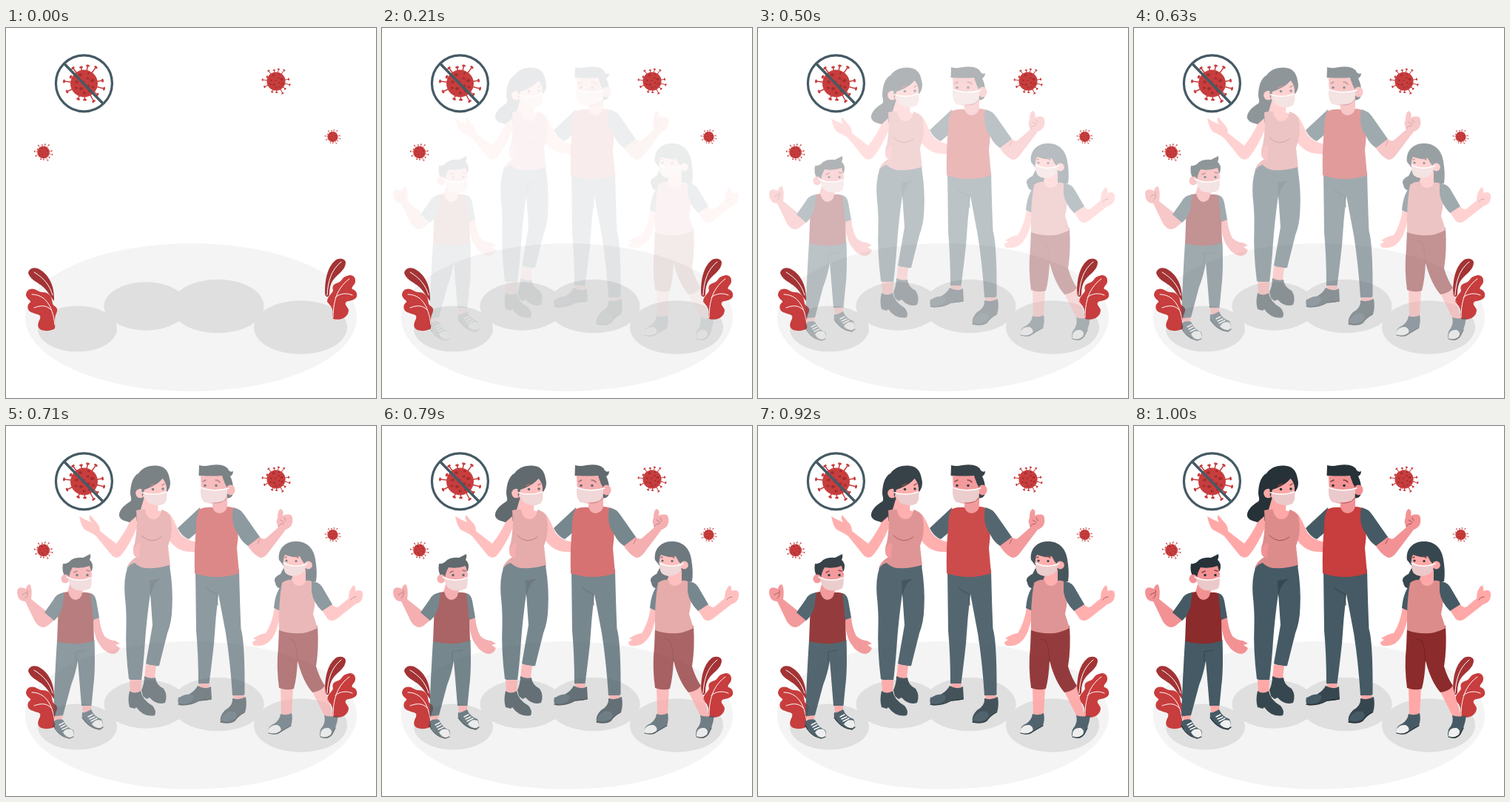
These frames come from a looping animation (500 by 500 pixels, 1040 ms). An HTML page:

```html
<!DOCTYPE html>
<html lang="en">
<head>
<meta charset="utf-8">
<title>Family in masks</title>
<style>
html, body { margin: 0; width: 100%; height: 100%; overflow: hidden; background: #fff; }
svg { display: block; width: 100vw; height: 100vh; }
.navy { fill: #455a64; }
.ink { fill: #263238; }
.slate { fill: #37474f; }
.skin { fill: #ffa8a7; }
.arm { fill: #f29294; }
.red { fill: #c83d3d; }
.wine { fill: #8b2b2c; }
.pink { fill: #dd8c8c; }
.mask { fill: #ebc9ca; }
.pale { fill: #f0f0f0; }
.line { fill: none; stroke-linecap: round; stroke-linejoin: round; }
.strap { stroke: #fff; stroke-width: 1.5; }
.fold { stroke: #37474f; stroke-width: 1.2; }
.crease { stroke: #a85055; stroke-width: 1; }
.brow { stroke: #8b3a3c; stroke-width: 1.4; }
.vein { stroke: #fff; stroke-width: 1; }
.sole { stroke: #263238; stroke-width: 1.3; }
</style>
</head>
<body>
<svg viewBox="0 0 500 500">
  <defs><g id="virus"></g></defs>

  <ellipse cx="250" cy="391" rx="224" ry="100" fill="#f4f4f4"/>
  <g fill="#dfdfdf">
    <ellipse cx="96.5" cy="406.5" rx="53.5" ry="31"/>
    <ellipse cx="189" cy="376" rx="56.5" ry="32.7"/>
    <ellipse cx="286" cy="376" rx="62.5" ry="36.3"/>
    <ellipse cx="398" cy="404.5" rx="63" ry="36.3"/>
  </g>

  <use href="#virus" transform="translate(105.5 75)"/>
  <use href="#virus" transform="translate(365 72) scale(.68)"/>
  <use href="#virus" transform="translate(50.6 168) scale(.45)"/>
  <use href="#virus" transform="translate(441.5 147) scale(.38)"/>
  <g fill="none" stroke="#455a64" stroke-width="3.2">
    <circle cx="105.4" cy="74.8" r="38"/>
    <path d="M78.500 48L131.500 102.500" stroke-width="3.600"/>
  </g>

  <!-- plants -->
  <path fill="#a33335" d="M30 331C31 325 37 323 43 325C56 331 66 346 65 369C60 363 56 354 48 348C41 343 32 339 30 331Z"/>
  <path class="red" d="M27 361C27 354 33 351 39 353C43 355 46 357 49 357C56 357 59 360 61 364C63 369 62 374 66 376C71 379 69 384 67 388C65 394 67 400 66 406C61 410 50 410 46 407C41 403 44 397 46 393C48 386 42 388 37 385C31 384 28 379 30 374C32 370 35 371 32 368C30 366 28 365 27 361Z"/>
  <path class="line vein" d="M38 330C50 337 59 347 63 361M35 360C52 360 63 374 66 401M38 378C48 374 56 375 61 381"/>
  <path fill="#a33335" d="M459 317C459 312 450 310 445 314C434 323 431 340 431 358C431 364 436 365 437 360C437 348 440 342 446 336C452 330 459 325 459 317Z"/>
  <path class="red" d="M441 388C443 379 438 375 434 370C434 363 440 360 442 355C440 347 444 346 449 344C454 343 454 336 461 335C468 332 473 337 472 343C471 348 466 350 468 353C473 354 475 359 474 363C471 369 464 368 460 370C456 373 462 377 463 381C463 391 452 396 442 393Z"/>
  <path class="line vein" d="M453 316C439 327 435 343 434 361M464 339C450 349 442 365 442 391M445 364C452 358 461 358 468 361"/>

  <g id="family" opacity="0">
    <!-- mother -->
    <path class="navy" d="M262 110L232 138Q237 149 247 153L259 143Z"/>
    <path class="ink" d="M217 90C222 84 223 78 221 71C219 59 213 54 203 53.500C191 53 183 58 179 64C171 68 168 80 168 92C169 97 170 100 168 102C158 108 152 115 153 122C156 129 164 128 168 131L178 128L186 110L190 100Z"/>
    <path class="skin" d="M187 96L206 101L205 114L211 116L206 130H188L181 116Z"/>
    <path class="skin" d="M215 115C226 119 230 137 235 145C242 153 249 155 258 157V170C244 171 236 168 230 164Q221 157 217 148Z"/>
    <path class="skin" d="M176 122L177 137Q167 161 156 174Q150 181 143 175L122 149Q117 145 108 141Q102 138 99 122L106 126L115 130Q111 123 114 120.500L121 129Q127 134 127 142L149 159Q160 145 167 130Z"/>
    <path class="pink" d="M176 114Q183 112 188 113Q190 126 200 126Q209 125 210 113Q218 115 222 122Q227 142 219 162L222 190Q202 201 163 193Q165 184 176 177Q169 169 174 158Q178 138 176 114Z"/>
    <path class="arm" d="M180 158Q172 163 172 170Q172 178 181 178Q179 168 182 161Z"/>
    <path class="line crease" d="M183 148Q196 161 210 150"/>
    <path class="navy" d="M164 192Q168 186 174 185Q185 198 221 188Q226 220 224.500 245Q224 265 218 280L207 324Q197 325 189 321L198 269L195 226Q190 262 188 290Q186 320 183 344Q174 346 166 342Q161 302 162.500 270Q163 250 160.500 228Q159 207 164 192Z"/>
    <path class="slate" d="M194 209L211 206Q198 211 195 232Z"/>
    <path class="skin" d="M167 343H183L182 361H168ZM189 322L203 324L201 341H187Z"/>
    <path class="slate" d="M187 338Q194 342 202 340Q203 350 213 355Q219 364 215 374Q204 378 194 367L190 369L185 365L183 357Q187 348 187 338ZM167 358Q174 363 182 358Q184 370 198 378Q204 385 201 391Q186 394 176 380L174 382L167 380Q164 370 167 358Z"/>
    <circle class="skin" cx="181.500" cy="91" r="6.300"/>
    <path class="skin" d="M185 86Q202 81 209 69Q216 74 217 83L217 99Q212 108 202 107Q188 105 185 94Z"/>
    <path class="ink" d="M182 64Q207 56 214 67Q208 79 187 86L184 97Z"/>
    <path class="mask" d="M186 92Q201 94 216 89Q218 101 214 105Q203 110 193 104Q188 100 186 92Z"/>
    <path class="line strap" d="M184 90Q201 95 217 89"/>
    <path class="line brow" d="M195 81Q198 78 201 79M211 80L214 78"/>
    <circle class="ink" cx="198.500" cy="85.500" r="1.800"/><circle class="ink" cx="212" cy="85" r="1.700"/>

    <!-- father -->
    <path class="arm" d="M279 100L299 94V110L303 114L288 124L274 113L279 110Z"/>
    <path class="arm" d="M326 161L342 149Q348 155 352 151L368 137Q364 129 367 124Q367 114 371 112Q376 114 374 121Q386 117 387 124Q389 136 378 140L353 173Q346 181 340 176Q333 172 326 161Z"/>
    <path class="line crease" d="M368 136Q370 132 375 132M371 127L376 130M376 124L378 128"/>
    <path class="line crease" d="M340 159L343 153"/>
    <path class="navy" d="M256 194H315Q316 240 317.500 274Q323 292 322.500 363Q315 367 306 364Q303 318 297 280L287 227Q283 260 281 294Q277 330 274.500 348Q267 351 260 348Q260 310 257 276Z"/>
    <path class="line fold" d="M271 219Q279 225 285 227L286 242"/>
    <path class="red" d="M262 112Q270 109 279 110Q282 118 289 118Q297 117 299 109Q306 109 311 113Q316 140 312 165L315 199Q285 209 255 199Q254 165 257 138Q257 118 262 112Z"/>
    <path class="navy" d="M307 110Q317 112 322 120L343 150L327 162Q319 157 314 147Q306 136 306 124Q306 116 307 110Z"/>
    <path class="skin" d="M261 348H275L274 355H261ZM307 364H322V370H308Z"/>
    <path class="slate" d="M259 351Q269 357 277 352L278 369Q268 372 261 371Q248 378 235 377Q231 374 233 367Q252 364 259 351ZM306 368Q315 371 324 366Q326 378 323 387Q314 392 309 399Q299 403 290 400Q288 392 296 384Q307 378 306 368Z"/>
    <path class="navy" d="M233 368Q243 360 253 364Q255 369 248 374Q240 377 233 375ZM291 395Q297 383 309 386Q314 390 309 396Q300 401 291 398Z"/>
    <path class="line sole" d="M233 376Q247 379 261 371L277 369M290 400Q303 403 309 398Q315 390 322 387"/>
    <path class="ink" d="M260.500 67L261 53Q268 55 276 53Q297 50 301 60Q304 63 307 61Q307 66 303 68Q309 80 306 94Q302 99 297 97L294 73Z"/>
    <path class="arm" d="M263 67Q279 68 292 67Q295 77 298 82L299 97Q294 105 280 105Q265 104 264 93Z"/>
    <ellipse class="arm" cx="303.500" cy="86.500" rx="6" ry="7"/>
    <path class="line crease" d="M280 104Q292 105 298 98"/>
    <path class="mask" d="M263 84Q282 89 299 84Q300 96 294 101Q282 105 268 103Q262 98 263 84Z"/>
    <path class="line strap" d="M263 83Q281 90 301 84"/>
    <path class="line brow" d="M266 75L270 73M283 73Q287 73 289 76"/>
    <circle class="ink" cx="269" cy="80.500" r="1.800"/><circle class="ink" cx="284" cy="80.500" r="1.800"/>

    <!-- boy -->
    <path class="arm" d="M86 214L103 220L104 228L96 238L82 228Z"/>
    <path class="arm" d="M54 250L34 234Q36 221 32.500 214Q28 214 27 220Q15 215 15 225Q16 237 26 237L39 264Q47 276 56 270L67 261Z"/>
    <path class="line crease" d="M29 222Q30 230 26 233M22 228L28 225"/>
    <path class="arm" d="M118 260L126 258Q127 273 133 284Q140 290 147 290L154 294L148 296L154 300Q151 308 144 308Q133 306 127 296Q118 285 118 260Z"/>
    <path class="navy" d="M69 289H119.500Q121 330 118 352L115.500 378Q108 380 102 378L97 317Q94 335 88 350L77 391Q70 394 64 391Q66 335 69 289Z"/>
    <path class="line fold" d="M95 319L95 305L108 303"/>
    <path class="wine" d="M77 225L84 224Q87 235 94 235Q102 234 103 225Q112 224 117 228L119 290Q95 298 69 291L71 238Z"/>
    <path class="navy" d="M79 225Q68 226 64 235L52 252L65 263L70 258Q77 247 77 238ZM114 226Q120 227 122 236L126 259L118 262Z"/>
    <path class="skin" d="M103 378H115V387H104ZM67 392L77 391L75 399H67Z"/>
    <path class="navy" d="M64 399Q70 395 77 397Q82 408 91 411Q94 419 86 421Q75 420 69 411Q62 406 64 399ZM103 387Q107 388 115 383Q119 393 129 396Q133 404 128 409Q118 411 109 401Q101 396 103 387Z"/>
    <path class="pale" d="M77 414Q82 407 90 411Q94 419 87 421Q81 421 77 414ZM116 403Q121 395 129 398Q133 405 128 408Q121 409 116 403Z"/>
    <path class="line" stroke="#fff" stroke-width="1.500" d="M72 404L78 401M74 407L80 404M76 410L83 407M111 393L117 390M113 396L120 393M115 399L123 395"/>
    <path class="line sole" d="M64 405Q72 420 86 422L91 420M103 394Q113 409 127 410L131 407"/>
    <path class="ink" d="M80 204Q75 196 77 186Q83 187 88 181Q95 177 104 178L114 173Q115 177 113 181Q119 185 116 196L100 196L88 204Z"/>
    <ellipse class="arm" cx="80" cy="206.500" rx="5.500" ry="6"/>
    <path class="arm" d="M85 208Q85 199 90 191Q102 193 113 189L116 200L115 213Q112 223 98 223Q86 220 85 208Z"/>
    <path class="mask" d="M84 206Q100 210 115 205Q117 216 113 220Q101 225 91 220Q85 215 84 206Z"/>
    <path class="line strap" d="M82 204Q99 212 115 205"/>
    <path class="line brow" d="M92 198L96 196M109 195L113 196"/>
    <circle class="ink" cx="96" cy="201.500" r="1.700"/><circle class="ink" cx="110" cy="201.500" r="1.700"/>

    <!-- girl -->
    <path class="slate" d="M369 181C367 168 375 157 390 156C407 155 416 166 418 180Q421 197 419 210L405 213L388 206L376 219Q365 221 364 212Q360 205 371 200L376 190Z"/>
    <path class="skin" d="M389 199L405 194V209L411 211L397 222L385 209Z"/>
    <path class="skin" d="M363 245L371 248L369 263Q365 281 358 289Q350 298 340 297Q333 298 333 292L338 289L334 287Q343 281 351 280Q360 266 363 245Z"/>
    <path class="navy" d="M376 211Q364 222 362 246L371 250Z"/>
    <path class="skin" d="M427 249L440 240Q446 248 451 243L463 233Q463 221 470 215Q473 218 472 223Q481 220 482 226Q483 238 472 241L449 259Q441 266 435 261Z"/>
    <path class="line crease" d="M466 235Q468 231 473 231"/>
    <path class="skin" d="M371 353H388L386 391H372ZM413 357L430 350L442 393H431Z"/>
    <path class="wine" d="M369 272L421 270Q423 300 419 325Q424 341 431 351Q425 359 414 360Q401 345 394 317Q393 340 389 355Q380 358 369 354Q365 325 368 298Z"/>
    <path class="line" stroke="#702022" d="M394 318Q393 300 389 290L382 288"/>
    <path class="pink" d="M373 212Q380 207 387 208Q389 216 396 216Q404 215 405 209Q413 208 416 213Q420 235 415 254L421 273Q398 286 369 276Q368 240 373 212Z"/>
    <path class="navy" d="M413 210Q422 210 427 217L441 241L427 250Q415 238 413 224Z"/>
    <path class="navy" d="M371 389Q379 392 386 388Q388 396 385 405Q375 411 368 416Q358 418 354 412Q356 404 363 402Q370 397 371 389ZM430 391Q440 394 449 391Q448 400 445 408Q441 418 436 421Q428 423 424 418Q424 409 428 406Q432 399 430 391Z"/>
    <path class="pale" d="M354 412Q357 403 367 404Q373 407 371 412Q363 418 355 415ZM425 416Q426 407 436 408Q442 411 439 417Q431 423 425 419Z"/>
    <path class="line sole" d="M355 415Q364 418 371 413L385 405M425 420Q435 424 441 416L445 408"/>
    <path class="skin" d="M375 190Q374 179 377 174Q390 179 397 176Q400 183 405 188L404 196Q398 204 387 203Q376 200 375 190Z"/>
    <circle class="skin" cx="408.500" cy="188" r="5.400"/>
    <path class="mask" d="M375 185Q390 192 405 187Q405 197 397 201Q385 205 378 199Q375 195 375 185Z"/>
    <path class="line strap" d="M375 185Q390 193 407 186"/>
    <path class="line brow" d="M377 178L379 177M391 176L395 178"/>
    <circle class="ink" cx="379" cy="182" r="1.600"/><circle class="ink" cx="392" cy="182.500" r="1.600"/>
  </g>
</svg>
<script>
const LOOP = 1040, FPS = 24;

// Spike tips and spots, measured from the virus centre
const tips = [[5, -24], [16, -22], [25, -4], [27, 7], [18, 15], [13, 24], [1, 22], [-8, 21],
  [-23, 11], [-27, -3], [-18, -9], [-15, -21], [-4, -22]];
const spots = [[-5, -12, 2.5], [5, -7, 2], [11, -4, 2.5], [-10, -2, 2.2], [-1, -2, 1.6], [6, 3, 1.8],
  [12, 5, 2], [-11, 6, 1.8], [-4, 7, 2.4], [0, 13, 2.2], [7, 11, 1.6], [6, -14, 1.6]];

const spike = ([x, y]) => {
  const turn = Math.atan2(y, x) * 180 / Math.PI;
  return `<path d="M0 0L${x} ${y}" stroke="#c83d3d" stroke-width="1.5"/>
    <ellipse class="red" rx="1.5" ry="2.5" transform="translate(${x} ${y}) rotate(${turn})"/>`;
};
const spot = ([x, y, r]) => `<ellipse cx="${x}" cy="${y}" rx="${r}" ry="${r * .8}" fill="#9d2f31"/>`;
document.getElementById("virus").innerHTML =
  tips.map(spike).join("") + '<circle class="red" r="18.5"/>' + spots.map(spot).join("");

// Fade curve: [progress, opacity]
const fade = [[0, 0], [.1, .032], [.2, .09], [.375, .225], [.5, .36], [.708, .606], [.833, .785], [.917, .92], [1, 1]];
const opacityAt = p => {
  const i = Math.max(1, fade.findIndex(([x]) => x >= p));
  const [x0, y0] = fade[i - 1], [x1, y1] = fade[i];
  return y0 + (y1 - y0) * (p - x0) / (x1 - x0);
};

const family = document.getElementById("family");
const start = performance.now();
function draw() {
  const t = Math.max(0, performance.now() - start) % LOOP;
  const step = Math.min(FPS, Math.floor((t + 4) * FPS / 1000));
  family.setAttribute("opacity", opacityAt(step / FPS).toFixed(3));
  requestAnimationFrame(draw);
}
draw();
</script>
</body>
</html>
```
